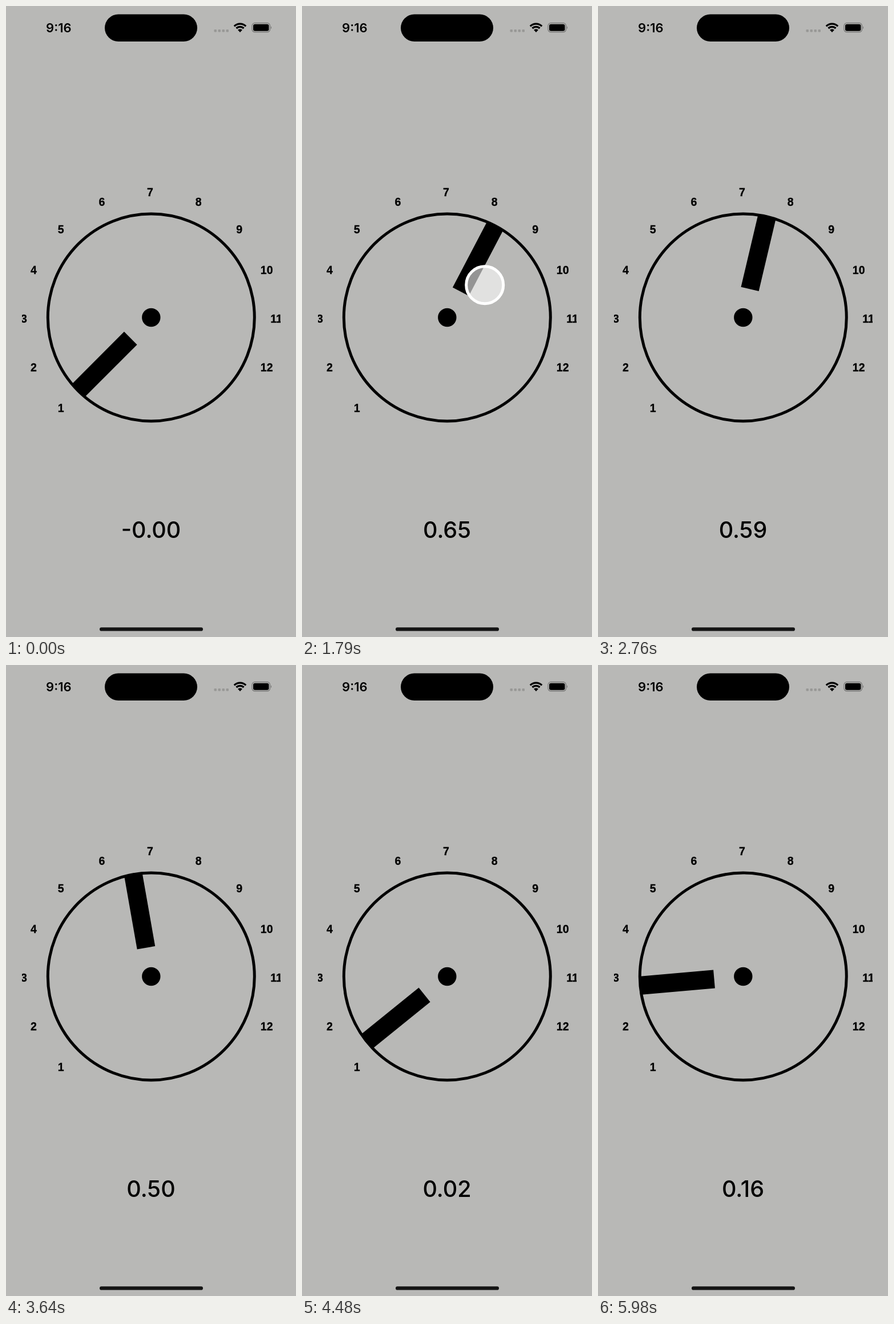
These frames come from a looping animation (508x1102 px, 6 s). An HTML page:

```html
<!DOCTYPE html>
<html lang="en">
<head>
<meta charset="utf-8">
<title>Dial</title>
<style>
  html, body { margin: 0; width: 100%; height: 100%; overflow: hidden; background: #b8b8b6; }
  svg { display: block; width: 100%; height: 100%; }
  text { text-anchor: middle; }
  .ui { font-family: Inter, sans-serif; }
  #numbers { font: bold 19.5px "Liberation Sans", Arial, sans-serif; stroke: #000; stroke-width: .3; }
</style>
</head>
<body>
<svg viewBox="0 0 508 1102">
  <clipPath id="dialArea"><rect x="28" y="300" width="453" height="430"/></clipPath>

  <text class="ui" x="92.3" y="46" font-size="22" font-weight="600">9:16</text>
  <rect x="173" y="14.5" width="162" height="47.5" rx="23.75"/>
  <g fill="#989896">
    <rect x="364.5" y="41" width="4.5" height="4.5" rx="1.3"/>
    <rect x="371.5" y="41" width="4.5" height="4.5" rx="1.3"/>
    <rect x="378.5" y="41" width="4.5" height="4.5" rx="1.3"/>
    <rect x="385.5" y="41" width="4.5" height="4.5" rx="1.3"/>
  </g>
  <g fill="none" stroke="#000" stroke-width="3.3">
    <path d="M399.8 35.3A14.5 14.5 0 0 1 420.2 35.3"/>
    <path d="M403.5 39A9.2 9.2 0 0 1 416.5 39"/>
  </g>
  <path d="M410 46L406 41.8A5.7 5.7 0 0 1 414 41.8Z"/>
  <rect x="431" y="29.7" width="31.5" height="16" rx="5" fill="none" stroke="#737372" stroke-width="1.2"/>
  <rect x="433" y="31.7" width="27.5" height="12" rx="3.2"/>
  <path d="M464 35.2Q466.4 37.7 464 40.2Z" fill="#737372"/>

  <g id="numbers" clip-path="url(#dialArea)"></g>
  <rect id="hand" x="238.3" y="364" width="32" height="129"/>
  <circle cx="254.3" cy="544" r="181" fill="none" stroke="#000" stroke-width="5"/>
  <circle cx="254.3" cy="544" r="16.2"/>
  <text id="readout" class="ui" x="254" y="928.5" font-size="39.5" font-weight="500"></text>
  <circle id="touch" r="32.5" fill="#fff" fill-opacity=".58" stroke="#fff" stroke-width="5"/>
  <rect x="164" y="1085.3" width="181" height="6.2" rx="3.1" fill="#141414"/>
</svg>
<script>
const LOOP = 6000;
const CENTER = { x: 254.3, y: 544 };
const START_ANGLE = -135, SWEEP = 250;
const TOUCH_RADIUS = 87, TOUCH_LEAD = 21.5;

const hand = document.getElementById('hand');
const readout = document.getElementById('readout');
const touch = document.getElementById('touch');

const polar = (x, y, radius, degrees) => {
  const a = degrees * Math.PI / 180;
  return [x + radius * Math.sin(a), y - radius * Math.cos(a)];
};

// Cubic bezier (.4, 0, .2, 1)
function settle(u) {
  if (u >= 1) return 1;
  let lo = 0, hi = 1;
  for (let i = 0; i < 24; i++) {
    const s = (lo + hi) / 2, r = 1 - s;
    if (1.2 * r * r * s + .6 * r * s * s + s * s * s < u) lo = s; else hi = s;
  }
  return lo * lo * (3 - 2 * lo);
}
const accelerate = u => u ** 1.5;
const smooth = u => u * u * (3 - 2 * u);

const moves = [
  { start: 755, length: 650, from: 0, to: .5, ease: settle },
  { start: 1620, length: 380, from: .5, to: 1, ease: accelerate, touchEnd: 2020 },
  { start: 2415, length: 650, from: 1, to: .5, ease: settle },
  { start: 3640, length: 650, from: .5, to: 0, ease: settle },
  { start: 4395, length: 650, from: 0, to: .5, ease: settle },
  { start: 5390, length: 570, from: .5, to: .16, ease: smooth, touchEnd: 5970 },
];

for (let n = 1; n <= 12; n++) {
  const [x, y] = polar(252.5, 546, 221, START_ANGLE + 22.5 * (n - 1));
  const label = document.createElementNS('http://www.w3.org/2000/svg', 'text');
  label.setAttribute('x', x);
  label.setAttribute('y', y + 7);
  label.textContent = n;
  document.getElementById('numbers').append(label);
}

function draw(t) {
  const move = moves.findLast(m => t >= m.start) || moves[0];
  const u = Math.min(1, Math.max(0, (t - move.start) / move.length));
  const value = move.from + (move.to - move.from) * move.ease(u);
  const angle = START_ANGLE + SWEEP * value;

  hand.setAttribute('transform', `rotate(${angle} ${CENTER.x} ${CENTER.y})`);
  readout.textContent = value === 0 ? '-0.00' : value.toFixed(2);

  const [x, y] = polar(CENTER.x, CENTER.y, TOUCH_RADIUS, angle + TOUCH_LEAD);
  touch.setAttribute('cx', x);
  touch.setAttribute('cy', y);
  touch.setAttribute('visibility', t < move.touchEnd ? 'visible' : 'hidden');
}

function tick() {
  draw(performance.now() % LOOP);
  requestAnimationFrame(tick);
}
tick();
</script>
</body>
</html>
```
